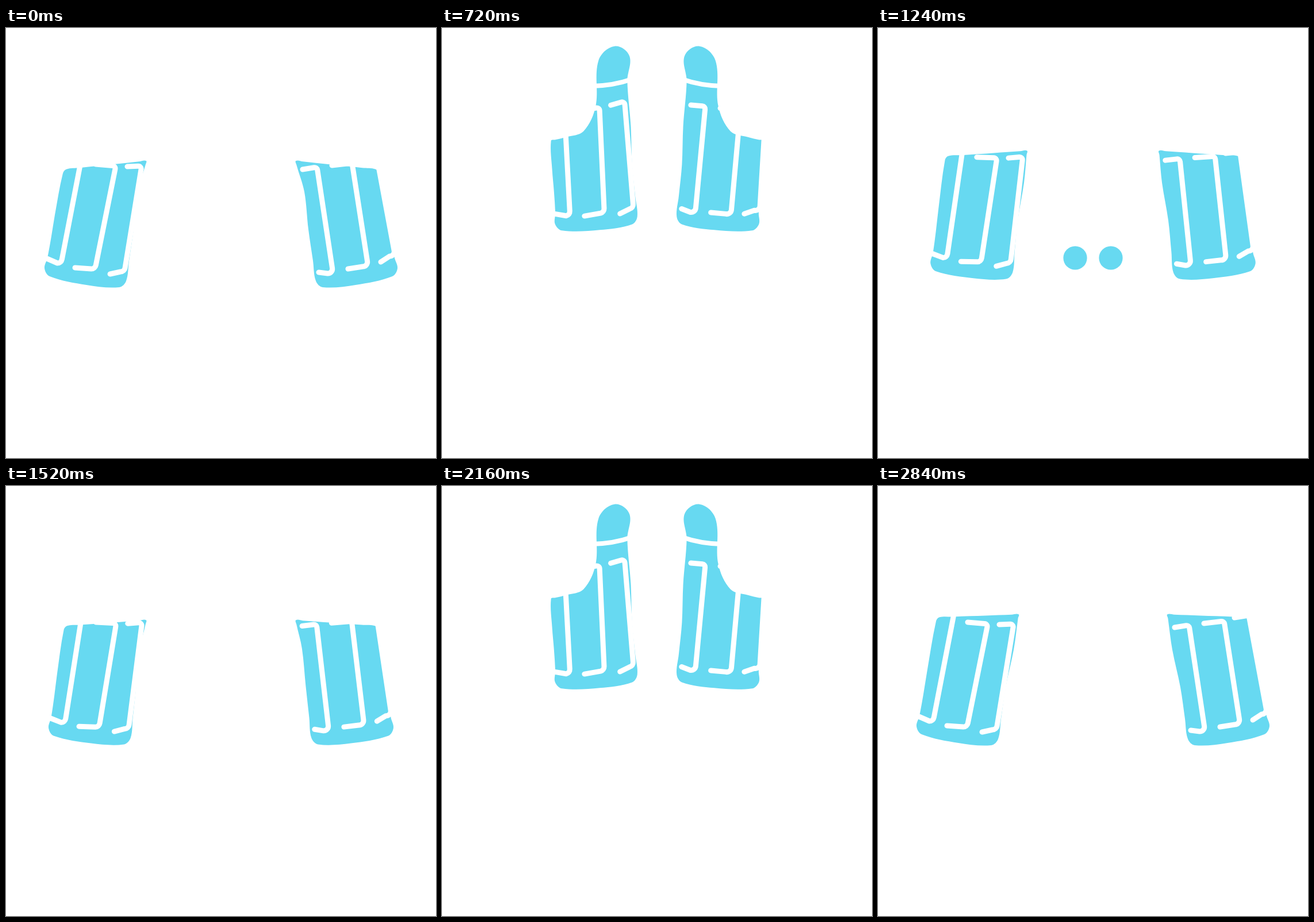
An HTML page with a canvas for the animation above (2.88 s loop, 748x748 px).

```html
<!DOCTYPE html>
<html lang="en">
<head>
<meta charset="utf-8">
<title>Cheers</title>
<style>
  html, body { margin: 0; width: 100%; height: 100%; overflow: hidden; background: #fff; }
  canvas { display: block; width: 100vmin; height: 100vmin; }
</style>
</head>
<body>
<canvas id="stage" width="748" height="748"></canvas>
<script>
const SIZE = 748, CYCLE = 1440, STEP = 40;
const BLUE = '#67d9f1';
const PIVOT = { x: 156, y: 418 };
const ctx = document.getElementById('stage').getContext('2d');

// Resting left mug: rim and walls, clockwise
const RIM = [[97, 206], [175, 204], [250, 206], [236, 285]];
const WALLS = [
  [222, 350], [214, 405], [209, 440], [197, 451], [140, 447],
  [76, 432], [67, 418], [72, 400], [79, 362], [85, 325]
];

// Liquid surface points: x when calm, x at full splash, share of the splash height
const SURFACE = [
  [101, 101, 0], [107, 109, 0], [130, 128, 0], [160, 160, 0.02], [186, 191, 0.3],
  [210, 215, 0.87], [232, 248, 1], [244, 269, 0.83], [243, 255, 0.52]
];

// Stripes: top corner to bottom corner
const STRIPES = {
  left: [[132, 223, 96, 409], [191, 240, 155, 419], [236, 240, 206, 424]],
  right: [[541, 242, 569, 427], [602, 235, 630, 415], [645, 225, 677, 397]]
};

function smooth(from, to, t) {
  const u = Math.min(1, Math.max(0, (t - from) / (to - from)));
  return u * u * (3 - 2 * u);
}

function mugPose(t) {
  const back = 1 - smooth(970, 1345, t);
  return {
    x: PIVOT.x + 127 * smooth(0, 560, t) * back,
    y: PIVOT.y - 99 * (smooth(160, 740, t) - smooth(820, 1360, t)),
    tilt: (16 * smooth(0, 360, t) - 2 * smooth(360, 720, t)) * back
  };
}

function liquidOutline(t) {
  const splash = smooth(490, 710, t) - smooth(820, 1130, t);
  const level = 239 + 37 * (smooth(400, 700, t) - smooth(820, 1040, t)) - 13 * smooth(1040, 1400, t);
  const slope = -15 + 77 * smooth(0, 360, t) - 62 * smooth(360, 720, t) - 5 * smooth(1040, 1400, t);
  const inset = 7 * Math.max(0, 1 - t / 300);
  const surface = SURFACE.map(([calm, full, lift], i) => {
    const base = level + slope * (calm - 170) / 140;
    const atWall = i === 0 || i === SURFACE.length - 1;
    return [
      calm + (full - calm) * splash + (228 - base) * 0.12,
      base - 133 * lift * splash + (atWall ? 7 * (1 - splash) : 0)
    ];
  });
  return [...surface, [236 - inset, 285], ...WALLS];
}

// Smooth closed curve through the points
function blob(points) {
  const n = points.length, at = i => points[(i + n) % n];
  ctx.beginPath();
  ctx.moveTo(...points[0]);
  for (let i = 0; i < n; i++) {
    const [a, b, c, d] = [at(i - 1), at(i), at(i + 1), at(i + 2)];
    const len = Math.hypot(c[0] - b[0], c[1] - b[1]);
    const handle = (from, to) => {
      const f = len / 3 / (Math.hypot(to[0] - from[0], to[1] - from[1]) || 1);
      return [(to[0] - from[0]) * f, (to[1] - from[1]) * f];
    };
    const h1 = handle(a, c), h2 = handle(b, d);
    ctx.bezierCurveTo(b[0] + h1[0], b[1] + h1[1], c[0] - h2[0], c[1] - h2[1], ...c);
  }
  ctx.closePath();
}

function drawStripe(side, [topX, topY, bottomX, bottomY], i) {
  const isLeft = side === 'left', length = i === 1 ? 35 : 25;
  ctx.beginPath();
  ctx.moveTo(topX - length, topY + (isLeft ? 4 * i - 7 : 4));
  ctx.arcTo(topX, topY, bottomX, bottomY, 5);
  ctx.arcTo(bottomX, bottomY, bottomX - length, bottomY, 8);
  ctx.lineTo(bottomX - length, bottomY + 6 * i - (isLeft ? 8 : 2));
  ctx.stroke();
}

function mirror() {
  ctx.translate(SIZE, 0);
  ctx.scale(-1, 1);
}

function drawDrop(t) {
  const fall = (t - 840) / 520;
  if (fall < 0 || fall > 1) return;
  ctx.fillStyle = BLUE;
  ctx.beginPath();
  ctx.arc(303 + 52 * fall, 50 + 455 * fall, 26 - 7 * fall, 0, 2 * Math.PI);
  ctx.fill();
}

function drawMug(t, side) {
  const { x, y, tilt } = mugPose(t);
  ctx.translate(x, y);
  ctx.rotate(-tilt * Math.PI / 180);
  ctx.translate(-PIVOT.x, -PIVOT.y);

  // Glass
  ctx.fillStyle = ctx.strokeStyle = '#fff';
  ctx.lineWidth = 36;
  blob([...RIM, ...WALLS]);
  ctx.fill();
  ctx.stroke();

  // Liquid
  ctx.fillStyle = BLUE;
  blob(liquidOutline(t));
  ctx.fill();

  // Rim and stripes
  ctx.lineWidth = 8;
  ctx.beginPath();
  ctx.moveTo(188, 201);
  ctx.quadraticCurveTo(225, 209, 256, 206);
  ctx.stroke();
  ctx.lineWidth = 9;
  if (side === 'right') mirror();
  STRIPES[side].forEach((stripe, i) => drawStripe(side, stripe, i));
}

function draw(t) {
  ctx.fillStyle = '#fff';
  ctx.fillRect(0, 0, SIZE, SIZE);
  ctx.lineCap = ctx.lineJoin = 'round';
  for (const paint of [drawDrop, drawMug]) {
    for (const side of ['left', 'right']) {
      ctx.save();
      if (side === 'right') mirror();
      paint(t, side);
      ctx.restore();
    }
  }
}

const start = performance.now();
function tick() {
  const elapsed = performance.now() - start;
  draw(Math.floor(elapsed / STEP) * STEP % CYCLE);
  requestAnimationFrame(tick);
}
tick();
</script>
</body>
</html>
```
